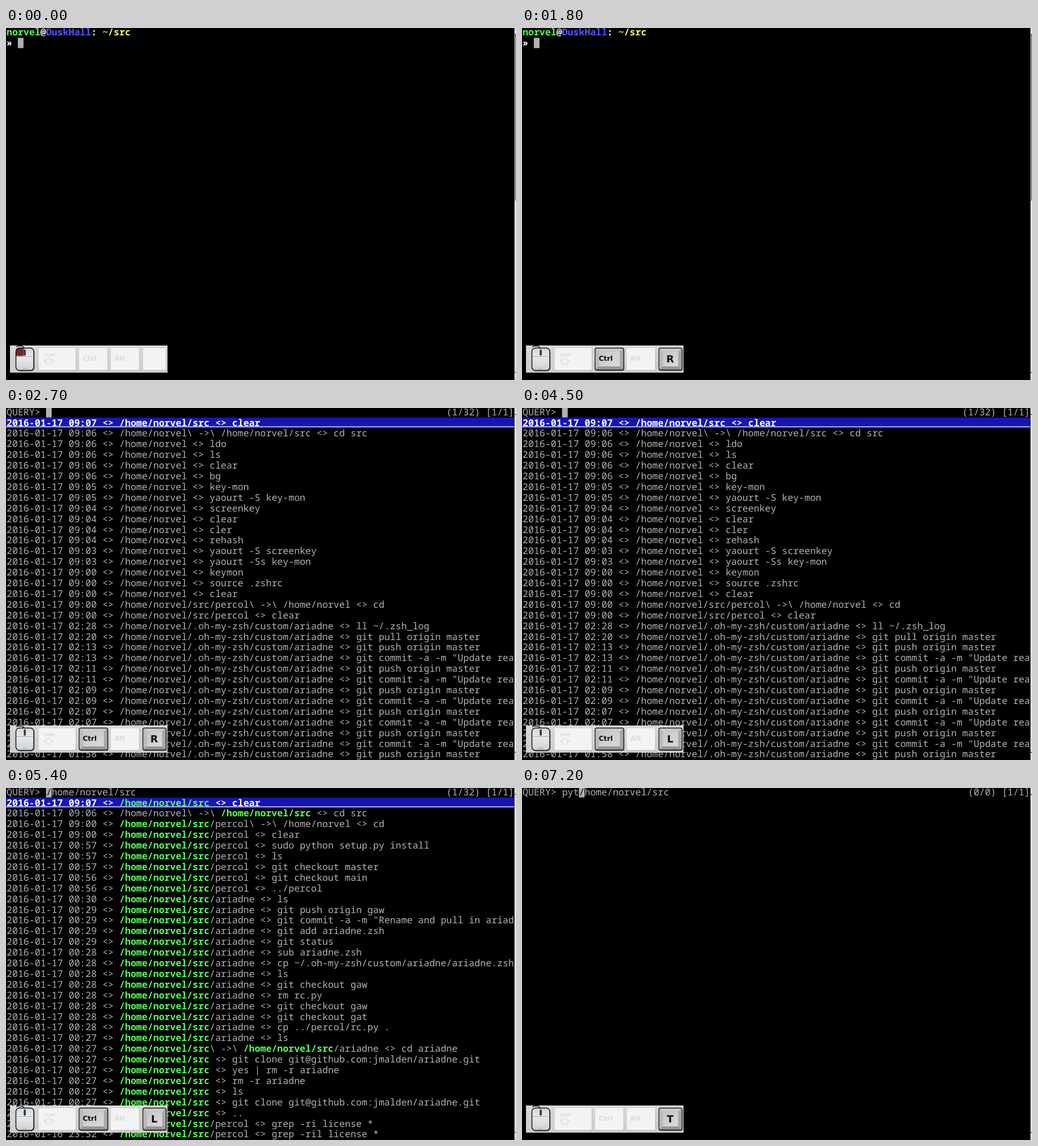
An HTML page for the animation above (8 s loop, 900 by 622 pixels).

```html
<!DOCTYPE html>
<html lang="en">
<head>
<meta charset="utf-8">
<title>Shell history search</title>
<style>
  html, body { margin: 0; width: 100%; height: 100%; overflow: hidden; background: #000; }
  svg { display: block; width: 900px; height: 622px; }
  text { white-space: pre; text-rendering: geometricPrecision; }
  .term text { font: 16.58px "Noto Sans Mono", "DejaVu Sans Mono", monospace; }
  .term text.b { font-weight: 700; }
  .keys text { font-family: "DejaVu Sans", sans-serif; font-weight: 700; }
</style>
</head>
<body>
<svg id="stage" viewBox="0 0 900 622">
  <defs>
    <linearGradient id="body" x2="0" y2="1">
      <stop offset="0" stop-color="#d3d8dd"/><stop offset=".4" stop-color="#e6e8ea"/>
      <stop offset="1" stop-color="#cfd2d5"/>
    </linearGradient>
    <linearGradient id="face" x2="1" y2="1">
      <stop offset="0" stop-color="#c6c6c6"/><stop offset="1" stop-color="#dadada"/>
    </linearGradient>
    <linearGradient id="panel" x2="0" y2="1">
      <stop offset="0" stop-color="#dad8d6"/><stop offset="1" stop-color="#cfcdca"/>
    </linearGradient>
  </defs>
  <rect width="900" height="622"/>
</svg>
<script>
const NS = "http://www.w3.org/2000/svg";
const stage = document.getElementById("stage");
const GREY = "#b2b2b2", WHITE = "#fff", GREEN = "#54ff54", BLUE = "#5454ff", YELLOW = "#ffff54";
const CELL = 9.95, LINE = 18.9, BASE = 12.6, COLS = 90;
const HOME = "/home/norvel", SRC = HOME + "/src";

function add(parent, tag, attrs, text) {
  const el = document.createElementNS(NS, tag);
  for (const k in attrs) el.setAttribute(k, attrs[k]);
  if (text !== undefined) el.textContent = text;
  return parent.appendChild(el);
}
const box = (g, x, y, width, height, fill, more) =>
  add(g, "rect", { x, y, width, height, fill, ...more });
const group = (parent, cls) => add(parent, "g", { class: cls || "" });
const show = (el, on) => el.setAttribute("display", on ? "inline" : "none");
const colX = col => 1 + col * CELL;

// Places each word on the character grid
function put(g, row, col, str, fill = GREY, bold = false) {
  for (const m of str.matchAll(/\S+/g))
    add(g, "text", { x: colX(col + m.index), y: BASE + row * LINE, fill, class: bold ? "b" : "" }, m[0]);
}
const cursor = (g, row, col) =>
  box(g, colX(col), row * LINE - 1.5, CELL, LINE - .8, GREY);

function putMatched(g, row, line, query, fill, bold) {
  let col = 0;
  line.split(query ? query : "\0").forEach((part, i) => {
    if (i) {
      put(g, row, col, query, GREEN, true);
      col += query.length;
    }
    put(g, row, col, part, fill, bold);
    col += part.length;
  });
}

// "time|path|command"; ~ is home, @ the custom plugin folder, > a directory change
const PATHS = {
  "~": HOME, s: SRC, p: SRC + "/percol", a: SRC + "/ariadne",
  "@": HOME + "/.oh-my-zsh/custom/ariadne"
};
function expand(entry) {
  const [time, path, cmd] = entry.split("|");
  const day = time > "23" ? 16 : 17;
  const dirs = path.split(">").map(p => PATHS[p]).join("\\ ->\\ ");
  return `2016-01-${day} ${time} <> ${dirs} <> ${cmd.replace("¦", "|")}`.slice(0, COLS);
}

const PUSH = "git push origin master", COMMIT = 'git commit -a -m "Update readme"';
const CLONE = "git clone git@github.com:jmalden/ariadne.git";
const history = [
  "09:07|s|clear", "09:06|~>s|cd src", "09:06|~|ldo", "09:06|~|ls", "09:06|~|clear", "09:06|~|bg",
  "09:05|~|key-mon", "09:05|~|yaourt -S key-mon", "09:04|~|screenkey", "09:04|~|clear",
  "09:04|~|cler", "09:04|~|rehash", "09:03|~|yaourt -S screenkey", "09:03|~|yaourt -Ss key-mon",
  "09:00|~|keymon", "09:00|~|source .zshrc", "09:00|~|clear", "09:00|p>~|cd", "09:00|p|clear",
  "02:28|@|ll ~/.zsh_log", "02:20|@|git pull origin master",
  ...["02:13", "02:11", "02:09", "02:07", "02:00"].flatMap(t => [`${t}|@|${PUSH}`, `${t}|@|${COMMIT}`]),
  "01:58|@|" + PUSH
];
const matches = [
  "09:07|s|clear", "09:06|~>s|cd src", "09:00|p>~|cd", "09:00|p|clear",
  "00:57|p|sudo python setup.py install", "00:57|p|ls", "00:57|p|git checkout master",
  "00:56|p|git checkout main", "00:56|p|../percol", "00:30|a|ls", "00:29|a|git push origin gaw",
  '00:29|a|git commit -a -m "Rename and pull in ariadne"', "00:29|a|git add ariadne.zsh",
  "00:29|a|git status", "00:28|a|sub ariadne.zsh",
  "00:28|a|cp ~/.oh-my-zsh/custom/ariadne/ariadne.zsh .", "00:28|a|ls", "00:28|a|git checkout gaw",
  "00:28|a|rm rc.py", "00:28|a|git checkout gaw", "00:28|a|git checkout gat",
  "00:28|a|cp ../percol/rc.py .", "00:27|a|ls", "00:27|s>a|cd ariadne", "00:27|s|" + CLONE,
  "00:27|s|yes ¦ rm -r ariadne", "00:27|s|rm -r ariadne", "00:27|s|ls", "00:27|s|" + CLONE,
  "00:27|s|..", "23:52|p|grep -ri license *", "23:52|p|grep -ril license *"
];

const term = group(stage, "term");

function promptScreen() {
  const g = group(term);
  put(g, 0, 0, "norvel", GREEN, true);
  put(g, 0, 6, "@", WHITE, true);
  put(g, 0, 7, "DuskHall", BLUE, true);
  put(g, 0, 15, ":", WHITE, true);
  put(g, 0, 17, "~/src", YELLOW, true);
  put(g, 1, 0, "»", WHITE, true);
  cursor(g, 1, 2);
  return g;
}

function searchScreen(typed, query, count, entries) {
  const g = group(term), at = 7 + typed.length;
  cursor(g, 0, at);
  put(g, 0, 0, "QUERY> " + typed);
  if (query) {
    put(g, 0, at, query[0], "#000");
    put(g, 0, at + 1, query.slice(1));
  }
  const info = `(${count}) [1/1]`;
  put(g, 0, COLS - info.length, info);
  if (entries.length) {
    box(g, 0, 17, 896.5, 18.7, "#1616b2");
    box(g, 0, 32.5, 896.5, 1.2, WHITE);
  }
  entries.forEach((e, i) =>
    putMatched(g, i + 1, expand(e), query, i ? GREY : WHITE, !i));
  return g;
}

const screens = {
  prompt: promptScreen(),
  list: searchScreen("", "", "1/32", history),
  match: searchScreen("", SRC, "1/32", matches),
  py: searchScreen("py", SRC, "0/0", []),
  pyt: searchScreen("pyt", SRC, "0/0", [])
};

// Scrollbar
box(stage, 897, 0, 3, 622, "#e6e6e6");
box(stage, 897, 0, 1, 622, "#8c8c8c");
const thumb = box(stage, 898, 12, 2, 293, "#8a8a8a");
for (const y of [11, 608]) box(stage, 898, y, 2, 1, "#000");

// Key display
const keys = group(stage, "keys");
box(keys, 7, 561, 278, 48, "url(#panel)");

function drawMouse() {
  add(keys, "path", { d: "M18 563Q31 559 33 568", fill: "none", stroke: "#111", "stroke-width": 1.4 });
  box(keys, 18.5, 567, 32, 40, "#8d8d8d", { rx: 6 });
  box(keys, 17.5, 565.5, 31.5, 39.5, "url(#body)", { rx: 6 });
  const click = add(keys, "path", { d: "M18 579.5V569Q18 566 21 566H31V579.5Z", fill: "#7f1f2a" });
  add(keys, "path", { d: "M18 580.5H49M33 566V580", stroke: "#aab0b6", "stroke-width": 1 });
  box(keys, 31.3, 568, 3.6, 11, "#33383d", { rx: 1.8 });
  box(keys, 29, 600.5, 8, 1.2, "#a4a8ac");
  box(keys, 17.5, 565.5, 31.5, 39.5, "none", { rx: 6, stroke: "#151515", "stroke-width": 1.5 });
  return click;
}

function idleKey(g, x, w) {
  box(g, x + 1, 567, w, 39, "#bfbdbb", { rx: 2 });
  box(g, x, 566, w, 38.5, "#f3f3f3", { rx: 2 });
}

function pressedKey(g, x, w) {
  const r = x + w, poly = (points, fill) => add(g, "polygon", { points, fill });
  box(g, x + 1, 566.5, w, 39.5, "#777", { rx: 3 });
  box(g, x, 565.5, w, 39, "#b2b2b2", { rx: 3 });
  poly(`${x},566 ${r},566 ${r - 7},572 ${x + 7},572`, "#c9c9c9");
  poly(`${x},566 ${x + 7},572 ${x + 7},598 ${x},604`, "#b9b9b9");
  poly(`${r},566 ${r - 7},572 ${r - 7},598 ${r},604`, "#a8a8a8");
  poly(`${x},604 ${r},604 ${r - 7},598 ${x + 7},598`, "#969696");
  box(g, x + 7, 572, w - 14, 26, "url(#face)");
  box(g, x, 565.5, w, 39, "none", { rx: 3, stroke: "#161616", "stroke-width": 1.3 });
}

const label = (x, y, size, fill, str, more) =>
  add(keys, "text", { x, y, "font-size": size, fill, ...more }, str);

const click = drawMouse();
idleKey(keys, 58, 65);
label(67, 580, 7, "#dadada", "Shift");
add(keys, "path", {
  d: "M75.5 583L84 589H80V594H71V589H67Z", fill: "none", stroke: "#dadada", "stroke-width": 1.2
});
idleKey(keys, 129, 50);
const ctrlKey = group(keys);
pressedKey(ctrlKey, 129, 50.5);
const ctrlText = label(135.5, 588, 12, "#dadada", "Ctrl");
idleKey(keys, 185, 50);
label(191, 588, 12, "#dadada", "Alt");
idleKey(keys, 242, 40);
const letterKey = group(keys);
pressedKey(letterKey, 241.5, 41);
const letterText = label(261.5, 591, 17.5, "#0a0a0a", "", { "text-anchor": "middle" });

// One step every 900 ms
const steps = [
  { screen: "prompt", click: true },
  { screen: "prompt" },
  { screen: "prompt", ctrl: true, key: "R" },
  { screen: "list", ctrl: true, key: "R" },
  { screen: "list" },
  { screen: "list", ctrl: true, key: "L" },
  { screen: "match", ctrl: true, key: "L" },
  { screen: "py", key: "Y" },
  { screen: "pyt", key: "T" }
];
const STEP = 900, LOOP = 8000;
let current = -1;

function render(time) {
  const i = Math.min(Math.floor((time % LOOP) / STEP), steps.length - 1);
  if (i === current) return;
  current = i;
  const s = steps[i];
  for (const name in screens) show(screens[name], name === s.screen);
  show(thumb, s.screen === "prompt");
  show(click, s.click);
  show(ctrlKey, s.ctrl);
  ctrlText.setAttribute("fill", s.ctrl ? "#0a0a0a" : "#dadada");
  show(letterKey, s.key);
  letterText.textContent = s.key || "";
}

function tick() {
  render(performance.now());
  requestAnimationFrame(tick);
}
tick();
</script>
</body>
</html>
```
